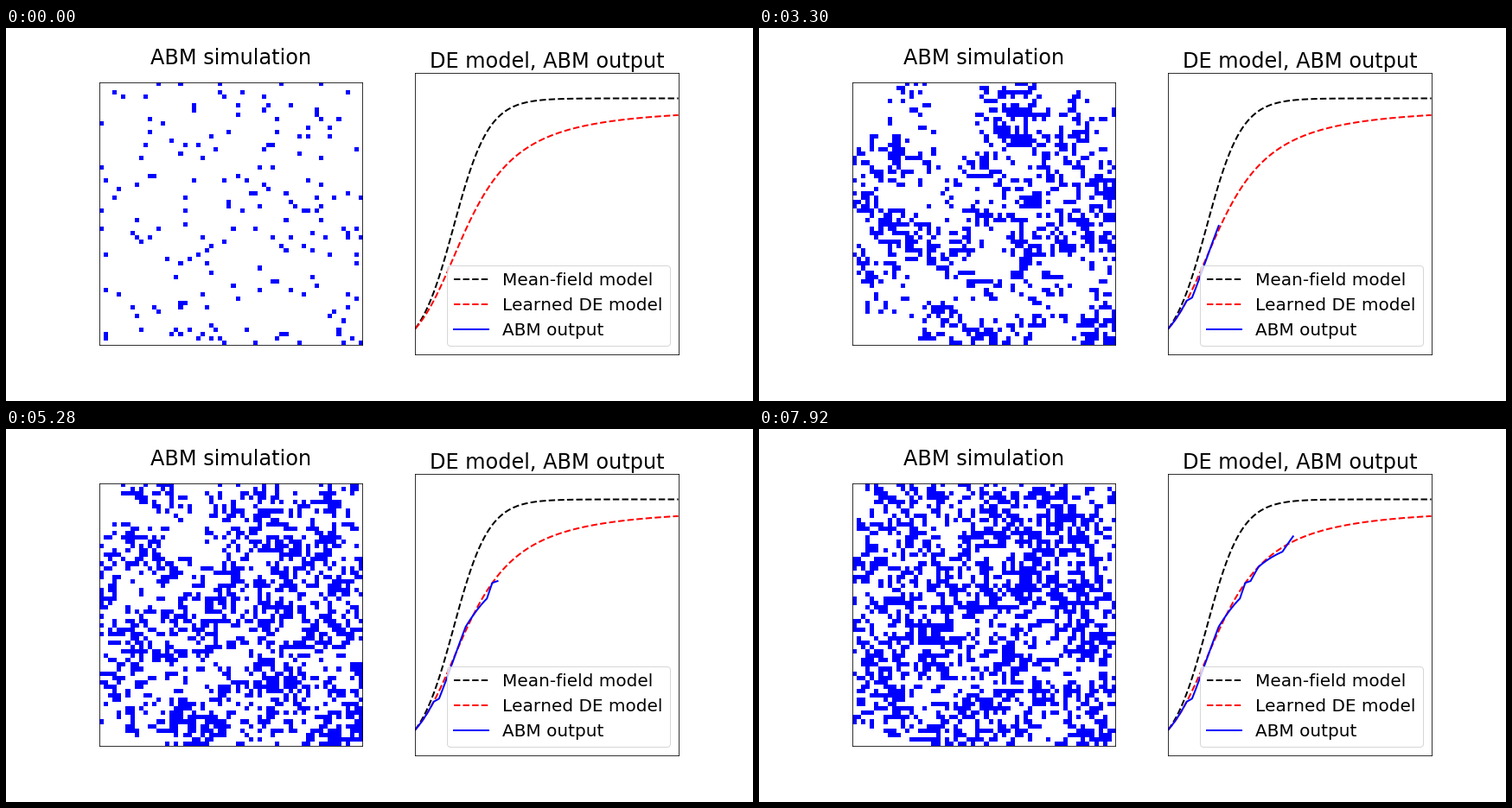
These frames come from a looping animation (864 by 432 pixels, 8000 ms). A matplotlib script:

```python
import numpy as np
import matplotlib.pyplot as plt
from matplotlib.animation import FuncAnimation
from matplotlib.colors import ListedColormap

LOOP, TICK, HOLD = 8000, 20, 330      # ms
STEPS = LOOP // HOLD + 1
SUB = 2                               # samples per step
N = 60                                # lattice side
CAPACITY = 0.5                        # density at which growth stops
U0 = 0.1                              # initial density over capacity

t = np.linspace(0, 15, 100)


def learned_curve(rate=0.91, limit=0.965, power=1.55):
    """Generalised logistic growth, integrated with the midpoint rule."""
    def slope(u):
        return rate * u * (1 - u / limit) ** power

    dt = t[1] - t[0]
    curve = [U0]
    for _ in t[1:]:
        u = curve[-1]
        curve.append(u + dt * slope(u + dt / 2 * slope(u)))
    return np.array(curve)


def simulate(counts, seed=7, death=0.13):
    """Agents die, walk and divide on a lattice; one state per step."""
    rng = np.random.default_rng(seed)
    sides = ((1, 0), (-1, 0), (0, 1), (0, -1))
    grid = np.zeros((N, N), int)
    grid.flat[rng.choice(N * N, counts[0], replace=False)] = 1

    def agents():
        return rng.permutation(np.argwhere(grid))

    def empty_side(y, x):
        dy, dx = sides[rng.integers(4)]
        y, x = y + dy, x + dx
        free = 0 <= y < N and 0 <= x < N and not grid[y, x]
        return (y, x) if free else None

    history = [grid.copy()]
    for i in range(1, SUB * (STEPS - 1) + 1):
        grid[rng.random((N, N)) < death] = 0
        for y, x in agents():
            spot = empty_side(y, x)
            if spot:
                grid[y, x], grid[spot] = 0, 1
        missing = counts[i] - grid.sum()
        while missing > 0:
            for y, x in agents():
                spot = empty_side(y, x)
                if spot and missing > 0:
                    grid[spot] = 1
                    missing -= 1
        if i % SUB == 0:
            history.append(grid.copy())
    return history


mean_field = 1 / (1 + (1 / U0 - 1) * np.exp(-t))
learned = learned_curve()

# The population wavers around the learned curve: (sample, deviation)
WAVER = [(0, 0), (7, 0), (9, -.03), (19, .016), (27, -.03),
         (29, 0), (31, -.02), (34, 0), (43, -.017), (47, .02)]
output = learned + np.interp(np.arange(len(t)), *zip(*WAVER))
lattices = simulate(np.rint(output * CAPACITY * N * N).astype(int))

plt.rcParams.update({"font.family": "DejaVu Sans", "text.kerning_factor": 6})
fig, (ax_grid, ax_curve) = plt.subplots(1, 2, figsize=(12, 6), dpi=72)
fig.subplots_adjust(left=0.125, right=0.9, bottom=0.125, top=0.88, wspace=0.2)
for ax in (ax_grid, ax_curve):
    ax.set_xticks([])
    ax.set_yticks([])

image = ax_grid.imshow(lattices[0], cmap=ListedColormap(["white", "blue"]),
                       vmin=0, vmax=1, interpolation="nearest")
ax_grid.set_title("ABM simulation", fontsize=24, pad=21)

ax_curve.plot(t, mean_field, "k--", lw=2, label="Mean-field model")
ax_curve.plot(t, learned, "r--", lw=2, label="Learned DE model")
trace, = ax_curve.plot([], [], "b-", lw=2, label="ABM output")
ax_curve.set_xlim(0, t[-1])
ax_curve.set_ylim(0, 1.1)
ax_curve.set_title("DE model, ABM output", fontsize=24, pad=6)
ax_curve.legend(loc="lower right", fontsize=20)


def update(i):
    step = min((i * TICK + TICK // 2) // HOLD, STEPS - 1)
    image.set_data(lattices[step])
    trace.set_data(t[:SUB * step], output[:SUB * step])
    return image, trace


anim = FuncAnimation(fig, update, frames=LOOP // TICK, interval=TICK,
                     init_func=lambda: update(0), repeat=True, repeat_delay=0)
plt.show()
```
